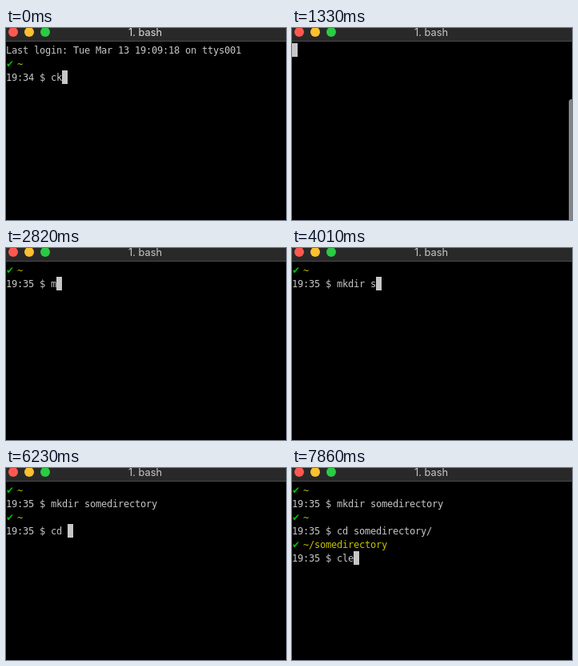
These frames come from a looping animation (350x240 px, 8 s). An HTML page:

```html
<!DOCTYPE html>
<html lang="en">
<head>
<meta charset="utf-8">
<title>Terminal</title>
<style>
  html, body { margin: 0; width: 100%; height: 100%; overflow: hidden; background: #000; }
  svg { display: block; width: 350px; height: 240px; }
  text { white-space: pre; }
  #rows text { font: 12px "DejaVu Sans Mono", monospace; }
  #rows .mark { font-family: "DejaVu Sans", sans-serif; }
  #title { font: 12.8px Inter, Roboto, sans-serif; text-anchor: middle; }
</style>
</head>
<body>
<svg viewBox="0 0 350 240">
  <rect width="350" height="240" fill="#000"/>
  <rect width="350" height="16" fill="#292929"/>
  <rect y="16" width="350" height="1" fill="#484b48"/>
  <circle cx="9" cy="5" r="6" fill="#ff5850"/>
  <circle cx="29" cy="5" r="6" fill="#ffbf2f"/>
  <circle cx="49" cy="5" r="6" fill="#29cc42"/>
  <text id="title" x="174" y="10">1. bash</text>
  <rect id="cursor" width="7" height="17" fill="#c7c7c7"/>
  <g id="rows"></g>
  <rect id="thumb" x="346" y="89" width="8" height="156" rx="3.5" fill="#858585"/>
</svg>
<script>
const LOOP = 8000, CELL = 7, LINE = 17, TOP = 19;
const GREY = '#c7c7c7', GREEN = '#00c200', YELLOW = '#c7c400', RED = '#c91b00';
const $ = id => document.getElementById(id);

// A row is a list of spans: [column, text, colour]
const plain = text => [[0, text, GREY]];
const okay = path => [[0, '✔', GREEN], [2, path, YELLOW]];
const failed = [[0, '✘', RED], [1, '-127', RED], [6, '~', YELLOW]];

// Each scene: the finished rows above, the prompt, and [time, input] steps
const login = [plain('Last login: Tue Mar 13 19:09:18 on ttys001'), okay('~')];
const made = [okay('~'), plain('19:35 $ mkdir somedirectory'), okay('~')];
const scenes = [
  { above: login, prompt: '19:34 $ ',
    steps: [[0, 'ck'], [150, 'cke'], [300, 'ckea'], [450, 'ckear']] },
  { above: [...login, plain('19:34 $ ckear'), plain('-bash: ckear: command not found'), failed],
    prompt: '19:34 $ ', steps: [[600, ''], [1040, 'ckear'], [1190, 'clear']] },
  { above: [], prompt: '', steps: [[1330, '']] },
  { above: [okay('~')], prompt: '19:35 $ ',
    steps: [[1480, ''], [2820, 'm'], [2970, 'mk'], [3270, 'mkd'], [3420, 'mkdi'],
      [3560, 'mkdir'], [3710, 'mkdir '], [4010, 'mkdir s'], [4160, 'mkdir some'],
      [4460, 'mkdir somed'], [4610, 'mkdir somedir'], [4750, 'mkdir somedirec'],
      [5050, 'mkdir somedirecto'], [5350, 'mkdir somedirector'], [5490, 'mkdir somedirectory']] },
  { above: made, prompt: '19:35 $ ',
    steps: [[5640, ''], [6080, 'c'], [6230, 'cd '], [6530, 'cd s'], [6670, 'cd som'],
      [6970, 'cd somedirectory/']] },
  { above: [...made, plain('19:35 $ cd somedirectory/'), okay('~/somedirectory')],
    prompt: '19:35 $ ', steps: [[7270, ''], [7710, 'c'], [7860, 'cle']] }
];
const states = scenes.flatMap(({ above, prompt, steps }) =>
  steps.map(([at, input]) => ({ at, above, line: prompt + input })));

function addSpan(row, [col, text, fill]) {
  const el = document.createElementNS('http://www.w3.org/2000/svg', 'text');
  el.setAttribute('x', [...text].map((_, i) => (col + i) * CELL).join(' '));
  el.setAttribute('y', TOP + row * LINE + 13);
  el.setAttribute('fill', fill);
  if ('✔✘'.includes(text)) el.setAttribute('class', 'mark');
  el.textContent = text;
  $('rows').append(el);
}

function drawScreen({ above, line }) {
  $('rows').replaceChildren();
  const rows = line ? [...above, plain(line)] : above;
  rows.forEach((row, i) => row.forEach(span => addSpan(i, span)));
  $('cursor').setAttribute('x', line.length * CELL);
  $('cursor').setAttribute('y', TOP + above.length * LINE);
}

let shown;
function render(t) {
  const state = states.findLast(s => s.at <= t);
  if (state !== shown) drawScreen(shown = state);
  $('title').setAttribute('fill', t < 600 ? '#dedede' : '#c6c6c6');
  $('thumb').setAttribute('opacity', t < 1330 || t >= 2070 ? 0 : t < 1920 ? 1 : 0.5);
}

const start = performance.now();
function tick() {
  render((performance.now() - start) % LOOP);
  requestAnimationFrame(tick);
}
tick();
</script>
</body>
</html>
```
